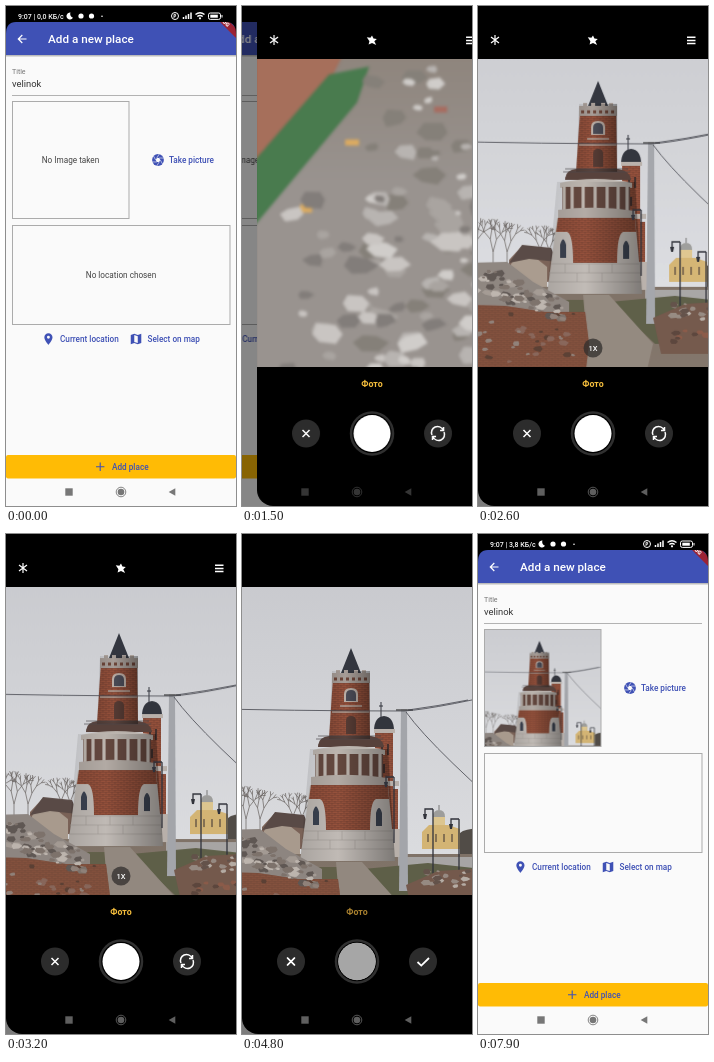
Recreate the animation shown at these times as an HTML page. Size 230 by 500 pixels, loop 8000 ms.

```html
<!DOCTYPE html>
<html lang="en">
<head>
<meta charset="utf-8">
<title>Add a new place</title>
<style>
html, body { margin: 0; width: 100%; height: 100%; overflow: hidden; background: #000; }
svg { display: block; }
#stage { width: 100vw; height: 100vh; font: 8.2px Roboto, "Noto Sans", sans-serif; }
.mid { text-anchor: middle; }
.btn { font-weight: 500; fill: #3f51b5; }

/* every part shares one 8 s clock */
.a { animation: 8s linear infinite; }
.step { animation-timing-function: step-end; }
.camera { animation-name: slide; }
.app { animation-name: back; }
.dim { animation-name: dim; }
.nav { animation-name: nav; }
.pan { animation-name: pan; }
.focus { animation-name: focus; }
.before { animation-name: before; }
.after { animation-name: after; }
.status { animation-name: status; }
.live { animation-name: live; }
.shot { animation-name: shot; }
.zoom { animation-name: zoom; }
.empty { animation-name: empty; }

@keyframes slide {
  0%, 15% { transform: translateX(230px); animation-timing-function: cubic-bezier(.33,1,.68,1); }
  21.25%, 71.25% { transform: translateX(0); animation-timing-function: cubic-bezier(.33,1,.68,1); }
  77.5%, 100% { transform: translateX(230px); }
}
@keyframes back {
  0%, 15% { transform: translateX(0); animation-timing-function: cubic-bezier(.33,1,.68,1); }
  21.25%, 71.25% { transform: translateX(-57.5px); animation-timing-function: cubic-bezier(.33,1,.68,1); }
  77.5%, 100% { transform: translateX(0); }
}
@keyframes dim {
  0%, 15% { opacity: 0; animation-timing-function: cubic-bezier(.33,1,.68,1); }
  21.25%, 71.25% { opacity: .5; animation-timing-function: cubic-bezier(.33,1,.68,1); }
  77.5%, 100% { opacity: 0; }
}
@keyframes nav {
  0%, 15% { opacity: 1; }
  18.75% { opacity: .45; }
  22.5%, 71.25% { opacity: .8; }
  75% { opacity: .25; }
  80%, 100% { opacity: 1; }
}
@keyframes pan {
  0%, 15% { transform: translate(0, -600px); }
  18.75% { transform: translate(0, -560px); }
  22.5% { transform: translate(16px, -410px); }
  26.25% { transform: translate(38px, -160px); animation-timing-function: ease-out; }
  35% { transform: translate(3px, -6px); }
  40% { transform: translate(0, 0); }
  56.25%, 100% { transform: translate(-4px, 15px); }
}
@keyframes focus {
  0%, 19% { filter: blur(1.8px); }
  26.25% { filter: blur(1.5px) brightness(1.06); }
  34%, 100% { filter: blur(0) brightness(1); }
}
@keyframes before { 0% { opacity: 1; } 15.6%, 100% { opacity: 0; } }
@keyframes after { 0% { opacity: 0; } 73.1%, 100% { opacity: 1; } }
@keyframes status { 0% { opacity: 1; } 15.6% { opacity: 0; } 73.1%, 100% { opacity: 1; } }
@keyframes live { 0% { opacity: 1; } 56.25%, 100% { opacity: 0; } }
@keyframes shot { 0% { opacity: 0; } 56.25%, 100% { opacity: 1; } }
@keyframes zoom { 0% { opacity: 0; } 23.75% { opacity: 1; } 56.25%, 100% { opacity: 0; } }
@keyframes empty { 0% { opacity: 1; } 92%, 100% { opacity: 0; } }
</style>
</head>
<body>
<svg id="stage" viewBox="0 0 230 500" preserveAspectRatio="none">
<defs>
  <linearGradient id="sky" x2="0" y2="1"><stop stop-color="#c3c4c9"/><stop offset="1" stop-color="#dcdde0"/></linearGradient>
  <linearGradient id="ground" x2="0" y2="1"><stop stop-color="#7f7267"/><stop offset=".35" stop-color="#8a7f75"/><stop offset=".6" stop-color="#99938f"/></linearGradient>
  <linearGradient id="round"><stop stop-color="#000" stop-opacity=".12"/><stop offset=".4" stop-color="#000" stop-opacity="0"/><stop offset="1" stop-color="#000" stop-opacity=".35"/></linearGradient>
  <pattern id="brick" width="6" height="4" patternUnits="userSpaceOnUse">
    <rect width="6" height="4" fill="#96523c"/><path d="M0 .3H6M0 2.3H6M1 0V2M4 2V4" stroke="#6d3b2e" stroke-width=".5"/>
  </pattern>
  <clipPath id="view"><rect y="53" width="230" height="308"/></clipPath>
  <clipPath id="page"><path d="M0 28Q0 16 10 16H220Q230 16 230 28V500H0Z"/></clipPath>

  <g id="lamp" stroke="#30323a" fill="#30323a" stroke-width="1.3">
    <path d="M0 0V66M0 0H-8V5" fill="none"/><path d="M-10 5h4l-1 5h-2z" stroke="none"/>
  </g>

  <g id="scene">
    <rect x="-60" y="-60" width="360" height="390" fill="url(#sky)"/>
    <!-- background houses and trees -->
    <g id="trees" fill="none" stroke="#66605e" stroke-width=".7"></g>
    <path d="M24 278L36 265L66 268L72 278V300H24Z" fill="#7a6257"/><path d="M26 282L38 266L62 285V305H26Z" fill="#a89a8d"/>
    <path d="M24 281L37 263L66 266L72 280L44 277Z" fill="#594a46"/>
    <path d="M184 298V283L191 276H210L222 280V300H184Z" fill="#d3b474"/>
    <path d="M195 276V268Q195 261 201 261T207 268V276Z" fill="#9d9d9b"/><path d="M201 261V256" stroke="#777"/>
    <path d="M195 268H207V276H195Z" fill="#dcc58f"/>
    <path d="M190 285v8M198 285v8M206 285v8M214 285v8" stroke="#857152" stroke-width="2"/>
    <path d="M222 284Q230 276 270 282V308H222Z" fill="#514c47"/>
    <!-- ground, grass and path -->
    <path d="M-60 305H300V1020H-60Z" fill="url(#ground)"/>
    <path d="M160 308H300V320H160Z" fill="#a7a5a4"/>
    <path d="M60 318H104L100 362H60Z" fill="#62604a"/>
    <path d="M125 320L190 314L300 326V362H170Z" fill="#5e5f48"/>
    <path d="M98 313H124L168 362L150 440H80L102 362Z" fill="#92887f"/>
    <!-- tower -->
    <path d="M137 180H155V240H160V306H137Z" fill="url(#brick)"/>
    <path d="M136 182Q136 168 146 167Q156 168 156 182Z" fill="#32353d"/><path d="M143 169V153M141 157h4" stroke="#32353d"/>
    <path d="M136 180H157V184H136ZM142 232H161V237H142ZM152 280H162V308H152Z" fill="#b8b0aa"/>
    <path d="M144 195v11M150 195v11M146 215v9" stroke="#43312e" stroke-width="2"/>
    <path d="M95 128H131L132 190H91Z" fill="url(#brick)"/>
    <path d="M113 99L123 124H103Z" fill="#33363f"/>
    <path d="M94 124H98V121H102V124H106V121H110V124H116V121H120V124H124V121H128V124H132V134H94Z" fill="#a69c96"/>
    <path d="M96 130H130" stroke="#6d4538" stroke-width="3" stroke-dasharray="3 3"/>
    <path d="M106 153V145Q106 139 113 139T120 145V153Z" fill="#b9ada5"/><path d="M108 152V146Q108 141 113 141T118 146V152Z" fill="#4a4b56"/>
    <path d="M102 157H124M94 163H131" stroke="#b0a198" stroke-width="1.4"/>
    <path d="M108 185V172Q108 167 113 167T118 172V185Z" fill="#563b34"/>
    <path d="M80 198Q80 188 91 187H133Q145 189 146 198Z" fill="#57413b"/>
    <path d="M78 190H145M80 187H143" stroke="#4d4a4d" stroke-width=".7"/>
    <path d="M75 201Q110 193 147 201V206H75Z" fill="#bbb4ae"/>
    <path d="M77 205H145V229H77Z" fill="#64483f"/>
    <path d="M79 203V230M87 203V230M98 202V230M110 202V230M122 202V230M133 203V230M142 203V230" stroke="#bdb5ae" stroke-width="3.2"/>
    <path d="M73 228Q110 223 150 229V237H73Z" fill="#b2aaa4"/>
    <path d="M72 236H150L157 312H62Z" fill="#c0bab5"/>
    <path d="M73 236H150L151 250H138Q132 252 132 281H88Q88 252 82 250H71Z" fill="url(#brick)"/>
    <path d="M75 276V263Q78 252 81 263V276ZM138 277V264Q141 254 144 264V277Z" fill="#3b4250"/>
    <path d="M66 282H154M64 291H155M63 300H156M80 282v9M104 282v9M127 282v9M92 291v9M117 291v9" stroke="#a49e99" stroke-width=".7"/>
    <path d="M72 200H150L157 312H62Z" fill="url(#round)"/><path d="M94 122H132V190H91Z" fill="url(#round)"/>
    <!-- pole, wires, lamps -->
    <path d="M163 160H169L170 342H161Z" fill="#a3a5aa"/><path d="M158 161H175" stroke="#555" stroke-width="1.5"/>
    <path d="M-60 159Q60 162 166 162Q200 160 300 136M168 163Q196 202 300 291M170 161Q200 157 230 151" fill="none" stroke="#44464d" stroke-width=".8"/>
    <use href="#lamp" x="195" y="260"/><use href="#lamp" x="156" y="228"/><use href="#lamp" x="221" y="270"/>
    <!-- low walls -->
    <path d="M-60 282L22 280L48 300L84 320V345H-60Z" fill="#8d8580"/>
    <path d="M-60 322L20 324L60 330H100L104 362L98 410L40 425L-60 455Z" fill="#72513f"/>
    <path d="M-60 322L20 324L60 330H100L104 362L98 410L40 425L-60 455Z" fill="url(#brick)" opacity=".5"/>
    <path d="M168 336L200 322L300 316V372H176Z" fill="#74594c"/>
    <!-- near ground -->
    <path d="M-60 590H95L75 630L-40 760H-60Z" fill="#a66f5b"/>
    <path d="M-60 780L72 628L112 620L100 656L0 776L-60 840Z" fill="#497b4e"/>
    <path d="M43 758h12v8h-12zM88 693h14v6h-14z" fill="#dcab60"/>
    <path d="M177 660h13v6h-13zM197 697h12v5h-12z" fill="#a86c60"/>
    <g id="rocks"></g>
  </g>
</defs>

<!-- form page -->
<g class="a app"><g clip-path="url(#page)">
  <rect y="16" width="230" height="484" fill="#fafafa"/>
  <path d="M0 49.5H230" stroke="#000" stroke-opacity=".25" stroke-width="2"/>
  <rect y="16" width="230" height="33" fill="#3f51b5"/>
  <path d="M20.5 33H12.5M16.3 29L12.3 33L16.3 37" fill="none" stroke="#fff" stroke-width="1.2"/>
  <text x="42" y="37" fill="#fff" font-size="11.7" font-weight="500">Add a new place</text>
  <g transform="translate(230 0) rotate(45)">
    <rect x="-24" y="15.6" width="48" height="7" fill="#9b2335"/>
    <text class="mid" y="21.1" font-size="5.6" font-weight="900" fill="#fff">DEBUG</text>
  </g>
  <text x="6" y="68" font-size="7" fill="#757575">Title</text>
  <text x="6" y="80.5" font-size="9.4" fill="#333">velinok</text>
  <path d="M6 89.5H224" stroke="#a0a0a0" stroke-width=".8"/>
  <text class="mid a step live" x="64.5" y="157" fill="#444">No Image taken</text>
  <svg class="a step shot" x="6" y="95.5" width="117" height="117" viewBox="0 92 230 230"><use href="#scene" transform="translate(-4 15)"/></svg>
  <g fill="none" stroke="#ababab"><rect x="6.5" y="95.5" width="116.5" height="117"/><rect x="6.5" y="219.5" width="217.5" height="99"/></g>
  <g id="shutter" transform="translate(152 154)"><circle r="5.9" fill="#3f51b5"/></g>
  <text class="btn" x="163" y="157">Take picture</text>
  <text class="mid a step empty" x="115" y="271.8" fill="#444">No location chosen</text>
  <g fill="#3f51b5">
    <path transform="translate(35.4 326) scale(.585)" d="M12 2C8.1 2 5 5.1 5 9c0 5.3 7 13 7 13s7-7.7 7-13c0-3.9-3.1-7-7-7zm0 9.5a2.5 2.5 0 1 1 0-5 2.5 2.5 0 0 1 0 5z"/>
    <path transform="translate(123 326) scale(.585)" fill-rule="evenodd" d="M3 5L9 3L15 5.1L21 3V19L15 21L9 18.9L3 21ZM9 5V16.9L15 19V7.1Z"/>
  </g>
  <text class="btn" x="54" y="336">Current location</text>
  <text class="btn" x="141.5" y="336">Select on map</text>
  <rect y="449" width="230" height="23.5" rx="2" fill="#ffbb05"/>
  <path d="M90 460.7H98.4M94.2 456.5V464.9" stroke="#3f51b5" stroke-width="1.1"/>
  <text class="btn" x="106" y="463.6">Add place</text>
</g></g>
<rect class="a dim" y="16" width="230" height="484"/>

<!-- camera -->
<g class="a camera">
  <rect width="246" height="500" rx="16"/>
  <g clip-path="url(#view)"><g class="a focus"><g class="a pan"><use href="#scene"/></g></g></g>
  <g class="a step live" stroke="#fff" fill="#fff">
    <path d="M17 29V39M13 31L21 37M13 37L21 31" stroke-width="1.2"/>
    <path d="M115 29.5l1.4 3 3.4.4-2.5 2.3 1.8 3.8-4.1-2-3.4 1.6.8-3.4-2.6-4 3.6.6z" stroke="none"/>
    <path d="M209 31.2H217.5M209 34.4H217.5M209 37.6H217.5" stroke-width="1.5"/>
  </g>
  <g class="a step zoom">
    <circle cx="115" cy="342" r="9.5" fill="#302d2c" fill-opacity=".75"/>
    <text class="mid" x="115" y="344.8" font-size="7.5" font-weight="500" fill="#fff">1X</text>
  </g>
  <g class="mid" font-size="8.8" font-weight="700">
    <text class="a step live" x="115" y="381" fill="#f4bd3c">Фото</text>
    <text class="a step shot" x="115" y="381" fill="#a9812f">Фото</text>
  </g>
  <g fill="#2c2c2c"><circle cx="49" cy="427.5" r="14"/><circle cx="181" cy="427.5" r="14"/></g>
  <circle cx="115" cy="427.5" r="21" stroke="#303030" stroke-width="2.5"/>
  <circle cx="115" cy="427.5" r="18.5" fill="#fff"/>
  <circle class="a step shot" cx="115" cy="427.5" r="18.7" fill="#a6a6a6"/>
  <g fill="none" stroke="#fff" stroke-width="1.5">
    <path d="M45.5 424L52.5 431M52.5 424L45.5 431"/>
    <path class="a step shot" d="M45 423.5L53 431.5M53 423.5L45 431.5"/>
    <path class="a step live" d="M175 429A6 6 0 0 1 186 424M187 426A6 6 0 0 1 176 431M186.5 421V424.5H183M175.5 434V430.5H179"/>
    <path class="a step shot" stroke-width="1.8" d="M175.5 428L179.3 431.6L187 424"/>
  </g>
</g>

<!-- system bars -->
<g class="a step status" fill="#fff">
  <path d="M64.5 6.5A3.5 3.5 0 1 0 67 11.8A4 4 0 0 1 64.5 6.5Z"/>
  <circle cx="75" cy="10" r="2.6"/><circle cx="85.5" cy="10" r="2.6"/><circle cx="96" cy="10.3" r=".8"/>
  <g fill="none" stroke="#fff">
    <circle cx="169" cy="10" r="3.5"/><path d="M168 12V8.4H169.6V10.3H168" stroke-width=".8"/>
    <path d="M177.5 13V11M180 13V9.5M182.5 13V8M185 13V6.5" stroke-width="1.5"/>
    <path d="M189.5 8.5Q194 5 198.5 8.5M191.3 10.5Q194 8.5 196.7 10.5" stroke-width="1.5"/>
    <rect x="202.5" y="7" width="12" height="6.4" rx="1.8"/><path d="M216 9V11.5"/>
  </g>
  <circle cx="194" cy="12.3" r="1.1"/><rect x="204.3" y="8.7" width="7.5" height="3"/>
</g>
<g font-size="7" font-weight="500" fill="#fff">
  <text class="a step before" x="12" y="12.6">9:07 | 0,0 КБ/с</text>
  <text class="a step after" x="12" y="12.6">9:07 | 3,8 КБ/с</text>
</g>
<g class="a nav" fill="#777">
  <rect x="59.3" y="482.3" width="7.4" height="7.4"/>
  <circle cx="115" cy="486" r="4.8" fill="none" stroke="#777" stroke-width=".9"/><circle cx="115" cy="486" r="3.3"/>
  <path d="M162.7 486L169.3 482.3V489.7Z"/>
</g>
</svg>
<script>
const byId = id => document.getElementById(id);
let seed = 7;
const rnd = () => {
  seed = (seed * 16807) % 2147483647;
  return seed / 2147483647;
};
const addPath = (id, d, attrs) => {
  const p = document.createElementNS("http://www.w3.org/2000/svg", "path");
  p.setAttribute("d", d);
  for (const k in attrs) p.setAttribute(k, attrs[k]);
  byId(id).append(p);
};

function stone(x, y, size) {
  const r = size * (0.4 + rnd());
  let d = "";
  for (let i = 0; i < 6; i++) {
    const a = i * Math.PI / 3, q = r * (0.7 + rnd() * 0.5);
    d += (i ? "L" : "M") + (x + q * Math.cos(a)).toFixed(1) + " " + (y + q * 0.6 * Math.sin(a)).toFixed(1);
  }
  return d + "Z";
}

// slope lowers the patch towards the right
function scatter(n, x, y, w, h, size, slope, fills) {
  for (const fill of fills) {
    let d = "";
    for (let i = 0; i < n; i++) {
      const px = x + rnd() * w;
      d += stone(px, y + rnd() * h + Math.max(0, px) * slope, size);
    }
    addPath("rocks", d, { fill });
  }
}
scatter(26, -50, 286, 130, 26, 4.5, 0.4, ["#5f5753", "#a39a93", "#bcb4ad", "#7d726b"]);
scatter(16, -50, 330, 145, 50, 4, 0, ["#5b4034", "#87665a", "#8f8179"]);
scatter(14, 178, 326, 100, 16, 4, -0.02, ["#968a82", "#b5aca4", "#63524a"]);
scatter(8, 185, 348, 90, 14, 4, 0, ["#8a5b49", "#5c463d"]);
scatter(34, -50, 440, 330, 150, 10, 0, ["#746a62", "#9c938b", "#aaa29b"]);
scatter(28, 110, 615, 170, 330, 12, 0, ["#858079", "#b8b4b1", "#d0cdca"]);
scatter(22, 30, 745, 220, 210, 13, 0, ["#a9a4a0", "#c9c5c2", "#827d7a"]);

// bare trees
function branch(x, y, len, angle, depth) {
  const x2 = x + len * Math.sin(angle), y2 = y - len * Math.cos(angle);
  const d = `M${x.toFixed(1)} ${y.toFixed(1)}L${x2.toFixed(1)} ${y2.toFixed(1)}`;
  if (!depth) return d;
  return d + branch(x2, y2, len * 0.72, angle - 0.2 - rnd() * 0.3, depth - 1)
           + branch(x2, y2, len * 0.72, angle + 0.2 + rnd() * 0.3, depth - 1);
}
for (const [x, y, len] of [[8, 288, 18], [22, 286, 16], [55, 280, 13], [64, 280, 12], [-12, 290, 19]])
  addPath("trees", branch(x, y, len, 0, 4), {});

// shutter blades
let blades = "", hex = "";
for (let i = 0; i < 6; i++) {
  const at = (r, t) => `${(r * Math.cos(t)).toFixed(2)} ${(r * Math.sin(t)).toFixed(2)}`;
  const t = i * Math.PI / 3;
  hex += (i ? "L" : "M") + at(2.3, t);
  blades += `M${at(2.3, t)}L${at(6, t + 0.72)}`;
}
addPath("shutter", hex + "Z", { fill: "#fafafa" });
addPath("shutter", blades, { stroke: "#fafafa", "stroke-width": 0.6 });
</script>
</body>
</html>
```
